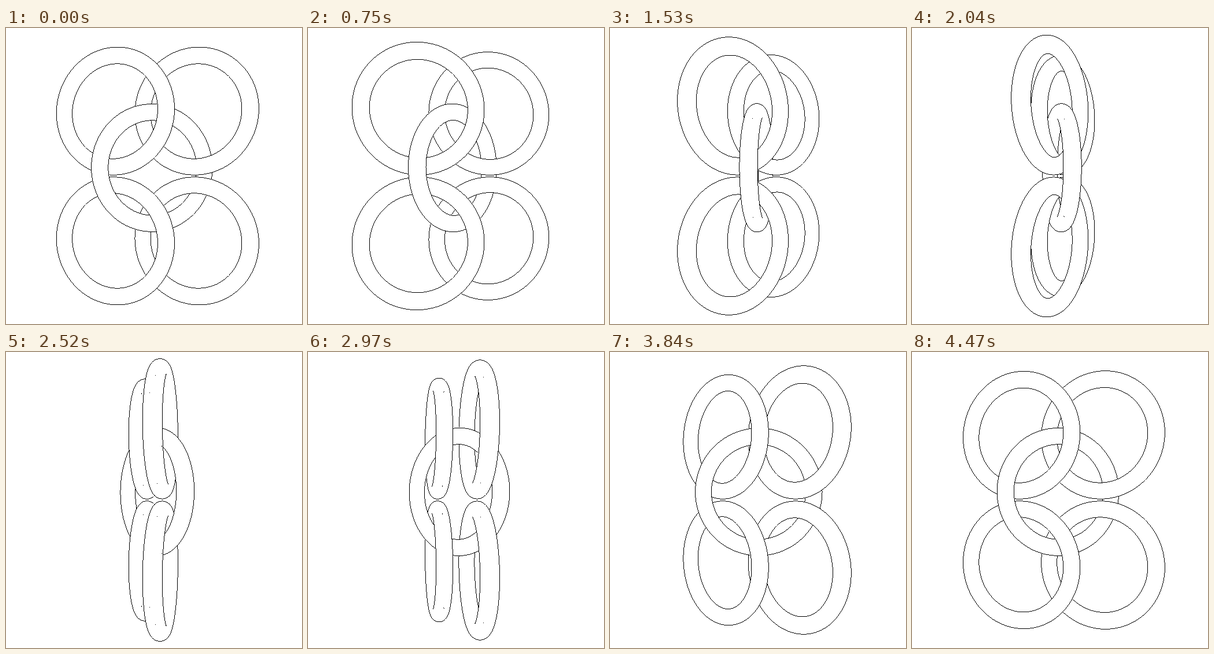
An HTML page with a canvas that plays this animation: 512x512 px, repeating every 4500 ms.

```html
<!DOCTYPE html>
<html lang="en">
<head>
<meta charset="utf-8">
<title>Linked rings</title>
<style>
html, body { margin: 0; width: 100%; height: 100%; overflow: hidden; background: #fff; }
canvas { display: block; width: 512px; height: 512px; image-rendering: pixelated; }
</style>
</head>
<body>
<canvas id="stage" width="512" height="512"></canvas>
<script>
const ctx = document.getElementById('stage').getContext('2d');

const STEP = 30, STEPS = 150;        // half a turn per loop
const R = 96.2, TUBE = 14;           // ring and tube radius
const CAM = 915, MID = 256;          // camera distance, stage centre
const TILT = 20 * Math.PI / 180;
const SIDE = 70.2, LIFT = 112, DROP = -14;
const SAMPLES = 720;

// offset from the turning axis, height, tilt
const layout = [
  [0, DROP, TILT],
  [-SIDE, -LIFT, -TILT], [SIDE, -LIFT, -TILT],
  [-SIDE, LIFT, -TILT], [SIDE, LIFT, -TILT]
];

function place(turn) {
  return layout.map(([off, y, tilt]) => {
    const b = turn + tilt;
    return {
      x: off * Math.cos(turn), y, z: -off * Math.sin(turn),
      c: Math.cos(b), s: Math.sin(b)
    };
  });
}

// signed distance to the nearest ring
function distance(rings, x, y, z) {
  let best = 1e9;
  for (const t of rings) {
    const dx = x - t.x, dy = y - t.y, dz = z - t.z;
    const along = dx * t.s + dz * t.c;
    const radial = Math.sqrt(Math.max(0, dx * dx + dy * dy + dz * dz - along * along)) - R;
    const d = Math.sqrt(radial * radial + along * along) - TUBE;
    if (d < best) best = d;
  }
  return best;
}

// walk from a surface point towards the camera
function visible(rings, x, y, z) {
  let vx = -x, vy = -y, vz = CAM - z;
  const len = Math.sqrt(vx * vx + vy * vy + vz * vz);
  vx /= len; vy /= len; vz /= len;
  for (let i = 0; i < 120 && z < 195; i++) {
    const d = distance(rings, x, y, z);
    if (d < 0.02) return false;
    x += vx * d; y += vy * d; z += vz * d;
  }
  return true;
}

// outline point at angle phi around the ring, on one side of the tube
function outline(rings, t, phi, sign) {
  const ch = Math.cos(phi), ey = Math.sin(phi);
  const ex = ch * t.c, ez = -ch * t.s;
  const a = t.x * ex + t.y * ey + (t.z - CAM) * ez + R;
  const b = t.x * t.s + (t.z - CAM) * t.c;
  const m = Math.hypot(a, b);
  if (m < TUBE) return null;
  const psi = Math.atan2(b, a) + sign * Math.acos(-TUBE / m);
  const cp = Math.cos(psi), sp = Math.sin(psi);
  const nx = cp * ex + sp * t.s, ny = cp * ey, nz = cp * ez + sp * t.c;
  const x = t.x + R * ex + TUBE * nx;
  const y = t.y + R * ey + TUBE * ny;
  const z = t.z + R * ez + TUBE * nz;
  const lift = 0.15;
  if (!visible(rings, x + nx * lift, y + ny * lift, z + nz * lift)) return null;
  const k = CAM / (CAM - z);
  return [MID + x * k, MID + y * k];
}

// thin line without smoothing
function line(p, q) {
  const major = Math.abs(q[0] - p[0]) > Math.abs(q[1] - p[1]) ? 0 : 1;
  const minor = 1 - major;
  if (p[major] > q[major]) [p, q] = [q, p];
  const slope = (q[minor] - p[minor]) / (q[major] - p[major] || 1);
  for (let i = Math.ceil(p[major] - 0.5); i + 0.5 < q[major]; i++) {
    const j = Math.floor(p[minor] + (i + 0.5 - p[major]) * slope);
    if (major) ctx.fillRect(j, i, 1, 1);
    else ctx.fillRect(i, j, 1, 1);
  }
}

function draw(step) {
  const rings = place(step / STEPS * Math.PI);
  ctx.fillStyle = '#fff';
  ctx.fillRect(0, 0, 512, 512);
  ctx.fillStyle = '#000';
  for (const t of rings) {
    for (const sign of [-1, 1]) {
      let last = null;
      for (let i = 0; i <= SAMPLES; i++) {
        const p = outline(rings, t, i / SAMPLES * 2 * Math.PI, sign);
        if (p && last) line(last, p);
        last = p;
      }
    }
  }
}

let shown = 0;
const start = performance.now();

function tick() {
  const step = Math.floor((performance.now() - start) / STEP) % STEPS;
  if (step !== shown) draw(shown = step);
  requestAnimationFrame(tick);
}

draw(0);
requestAnimationFrame(tick);
</script>
</body>
</html>
```
